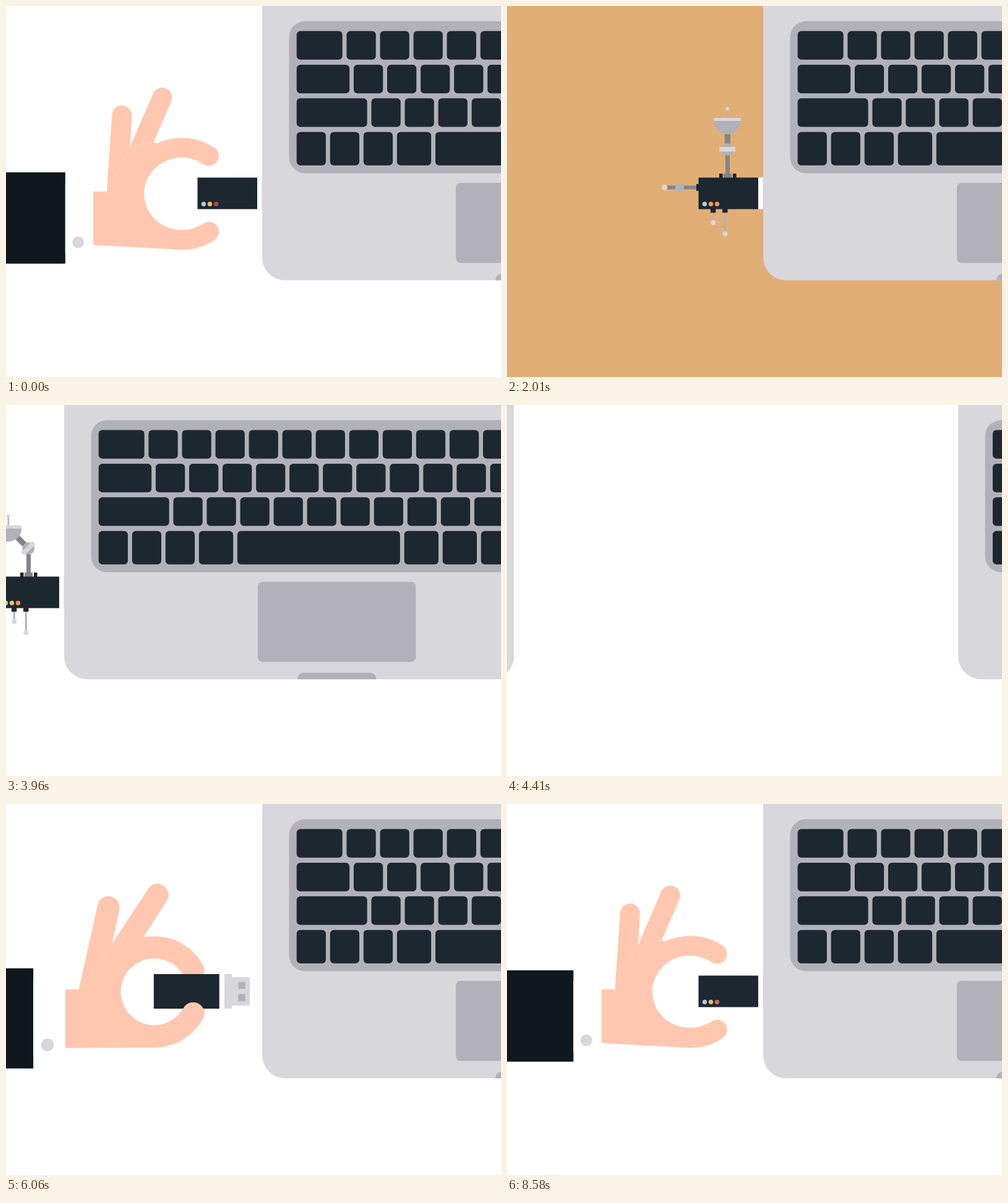
Write an HTML page with a canvas that moves like this. It is 800x600 px and loops after 8.61 s.

```html
<!DOCTYPE html>
<html lang="en">
<head>
<meta charset="utf-8">
<title>Plug in</title>
<style>
html, body { margin: 0; width: 100%; height: 100%; overflow: hidden; background: #fff; }
canvas { display: block; width: 800px; height: 600px; }
</style>
</head>
<body>
<canvas id="stage" width="800" height="600"></canvas>
<script>
const ctx = document.getElementById('stage').getContext('2d');
const LOOP = 8610, STEP = 30;
const C = {
  sand: '#e1af76', skin: '#ffc7af', sleeve: '#10181e', dark: '#1d2730',
  light: '#d8d7dc', mid: '#b2b1b9', steel: '#84848a', white: '#fff'
};

// ---- helpers ----
const lerp = (a, b, k) => a + (b - a) * k;
const part = (t, a, b) => Math.min(1, Math.max(0, (t - a) / (b - a)));
const easeOut = k => 1 - (1 - k) ** 3;
const easeIO = k => k < .5 ? 4 * k ** 3 : 1 - (2 - 2 * k) ** 3 / 2;
const move = (t, a, b, from, to, ease = easeIO) => lerp(from, to, ease(part(t, a, b)));

// cubic-bezier(.3625, 0, .1, 1), solved by bisection
function panEase(x) {
  let lo = 0, hi = 1, s = .5;
  for (let i = 0; i < 30; i++) {
    s = (lo + hi) / 2;
    const q = 1 - s;
    if (3 * q * q * s * .3625 + 3 * q * s * s * .1 + s ** 3 < x) lo = s; else hi = s;
  }
  return s * s * (3 - 2 * s);
}

function box(x1, y1, x2, y2, color) {
  ctx.fillStyle = color;
  ctx.fillRect(x1, y1, x2 - x1, y2 - y1);
}
function round(x1, y1, x2, y2, r, color) {
  ctx.fillStyle = color;
  ctx.beginPath();
  ctx.roundRect(x1, y1, x2 - x1, y2 - y1, r);
  ctx.fill();
}
function dot(x, y, r, color) {
  ctx.fillStyle = color;
  ctx.beginPath();
  ctx.arc(x, y, r, 0, Math.PI * 2);
  ctx.fill();
}
function shifted(x, y, draw, scale = 1, angle = 0) {
  ctx.save();
  ctx.translate(x, y);
  ctx.rotate(angle);
  ctx.scale(scale, scale);
  draw();
  ctx.restore();
}

// ---- laptop ----
const KEYS_LEFT = 469.7, KEYS_RIGHT = 1240, KEY = 47.3, GAP = 6.75;

function laptop() {
  round(414, -60, 1296, 443.5, 37, C.light);
  round(457.5, 24.5, 1252, 270.5, 26, C.mid);
  // the first key of a row sets its stagger, the last one fills the rest
  [74, 85.5, 114].forEach((first, row) => {
    const y = 40.5 + 54.4 * row;
    for (let x = KEYS_LEFT, w = first; x < KEYS_RIGHT; x += w + GAP, w = KEY) {
      if (x + w + GAP + KEY > KEYS_RIGHT) w = KEYS_RIGHT - x;
      round(x, y, x + w, y + 46.3, 6, C.dark);
    }
  });
  for (let i = 0, x = KEYS_LEFT; i < 10; i++) {
    const w = i === 4 ? 263 : i > 2 && i < 7 ? 55.3 : KEY;
    round(x, 203.7, Math.min(x + w, KEYS_RIGHT), 257.7, 6, C.dark);
    x += w + GAP;
  }
  round(727, 286, 982.5, 415.5, 8, C.mid);
  round(791, 433, 918.5, 443.5, [10, 10, 0, 0], C.mid);
}

// ---- hand: local space starts at the sleeve edge ----
// Thumb and forefinger form one elliptic ring, open by `gap` on each side.
const GRIP = {
  cx: 178.2, rx: 65.6, ry: 65.6, width: 32.8, gap: .506,
  littleX: 110.8, littleY: -124, longX: 182.8, longY: -142.2,
  forkX: 116.2, forkY: -70.2, webX: 161.8, webY: -79.3
};
const OPEN = {
  cx: 188.5, rx: 77, ry: 74.5, width: 32, gap: .968,
  littleX: 91.5, littleY: -126, longX: 156.5, longY: -155,
  forkX: 104.5, forkY: -75, webX: 142.5, webY: -82
};
const BASE_X = 67, BASE_Y = -3, RING_Y = .7;

function finger(x, y, r, x1, y1, x2, y2) {
  const a = Math.atan2(y - (y1 + y2) / 2, x - (x1 + x2) / 2) - Math.PI / 2;
  ctx.fillStyle = C.skin;
  ctx.beginPath();
  ctx.moveTo(x1, y1);
  ctx.arc(x, y, r, a, a + Math.PI);
  ctx.lineTo(x2, y2);
  ctx.fill();
}

function hand(open) {
  const p = {};
  for (const k in GRIP) p[k] = lerp(GRIP[k], OPEN[k], open);
  const r = p.width / 2;
  finger(p.littleX, p.littleY, r, BASE_X, BASE_Y, p.forkX, p.forkY);
  finger(p.longX, p.longY, r, p.forkX, p.forkY, p.webX, p.webY);

  ctx.beginPath();
  ctx.moveTo(45, BASE_Y);
  ctx.lineTo(BASE_X, BASE_Y);
  ctx.lineTo(p.forkX, p.forkY);
  ctx.lineTo(p.webX, p.webY);
  ctx.ellipse(p.cx, RING_Y, p.rx, p.ry, 0, -Math.PI / 2, Math.PI / 2, true);
  ctx.lineTo(p.cx, RING_Y + p.ry + r);
  ctx.lineTo(45, 83.5);
  ctx.fill();

  ctx.strokeStyle = C.skin;
  ctx.lineWidth = p.width;
  ctx.lineCap = 'round';
  ctx.beginPath();
  ctx.ellipse(p.cx, RING_Y, p.rx, p.ry, 0, -p.gap, p.gap, true);
  ctx.stroke();
}

function arm(open) {
  hand(open);
  box(-600, -34, 0, 113.7, C.sleeve);
  box(0, -17, lerp(47, 45, open), 97.2, C.white);
  dot(20.8, 79, 9.4, C.light);
}

// ---- stick ----
const STICK_X = 132, MID_Y = 303;

function stick() {
  box(281, -25.5, 292.5, 25.5, C.light);
  box(292, -21, 319, 21, C.light);
  box(302, -13.7, 312.3, -3.7, C.mid);
  box(302, 4, 312.3, 14.5, C.mid);
  box(273.5, -25.5, 281.5, 25.5, C.white);
  box(177.5, -25.5, 274, 25.5, C.dark);
}

function leds(t) {
  const blink = t > 7000 || t < 780;
  const glow = blink ? .5 + .5 * Math.cos((t + LOOP - 8520) % LOOP / 300 * Math.PI * 2) : 1;
  const third = [lerp(122, 239, glow), lerp(46, 146, glow), lerp(52, 84, glow)].map(Math.round);
  const second = t > 700 && t < 3300 ? '#ef9f5a' : '#f4b862';
  ctx.globalAlpha = t > 5300 ? part(t, 7440, 7620) : 1;
  ['#a7cfe0', second, `rgb(${third})`].forEach((c, i) => dot(319.5 + 10 * i, 320.2, 3.7, c));
  ctx.globalAlpha = 1;
}

// ---- gadgets folding out of the stick ----
function dish(t) {
  const rise = move(t, 450, 930, 76, 0, easeOut);
  const grow = easeIO(part(t, 1050, 1950));
  const tilt = move(t, 2130, 2760, 0, -Math.PI / 4);
  const len = lerp(24, 46, grow), r = lerp(9.5, 21.5, grow);
  box(353, 240 + rise, 360, 320, C.steel);
  box(350, 271 + Math.min(rise, 8), 363, 290, C.steel);
  shifted(356.3, 232 + rise, () => {
    box(-4.5, -len, 4.5, 0, C.steel);
    shifted(0, -len, () => {
      const feed = 20 * part(grow, .45, 1);
      if (feed > 3) {
        box(-1.3, -feed, 1.3, 0, C.mid);
        dot(0, -feed, 3, C.light);
      }
      ctx.fillStyle = C.mid;
      ctx.beginPath();
      ctx.arc(0, 0, r, 0, Math.PI);
      ctx.fill();
      box(-r, -lerp(2.5, 5, grow), r, 0, C.light);
    }, 1, -tilt);
    dot(0, 0, 10, C.mid);
    box(-12.8, -4, 12.8, 3.3, C.light);
  }, 1, tilt);
  const clip = (x, a) => box(x, move(t, a, a + 210, 278, 271, easeOut), x + 5.6, 278, C.dark);
  clip(343, 720);
  clip(365, 930);
}

function feeler(t) {
  const out = easeOut(part(t, 540, 900));
  const on = easeIO(part(t, 1020, 1620));
  const jx = lerp(lerp(318, 292, out), 279, on);
  const len = move(t, 1650, 2130, 0, 26) + move(t, 2580, 3060, 0, 80);
  const turn = move(t, 2130, 2580, 0, Math.PI / 4);
  const y = 293.5;
  shifted(jx, y, () => {
    if (len < 1) return;
    box(-Math.min(len, 42), -3, 0, 3, C.steel);
    box(-Math.min(len, 81), -2, 0, 2, C.steel);
    box(-len, -1.2, 0, 1.2, C.steel);
    dot(-len, 0, 4.7, C.light);
  }, 1, turn);
  box(jx, y - 3, 318, y + 3, C.steel);
  dot(jx, y, 7, C.mid);
  box(lerp(lerp(324, 298, out), 306, on), 288, 326, 299, C.dark);
}

function pin(t, x, start, tipA, tipB, endA, endB) {
  const out = easeOut(part(t, start, start + 330));
  const on = easeIO(part(t, 1050, 1800));
  const tip = lerp(lerp(322, tipA, out), tipB, on);
  const end = lerp(lerp(320, endA, out), endB, on);
  box(x - 1.5, 318, x + 1.5, tip, C.mid);
  dot(x, tip, 4, C.light);
  box(x - 4.2, 318, x + 4.2, end, C.dark);
}

function gadgets(t) {
  dish(t);
  feeler(t);
  pin(t, 333.2, 570, 342, 350.3, 340, 334.3);
  pin(t, 352.3, 660, 337, 368.3, 334.8, 334.3);
}

// ---- scenes ----
function device(t) {
  gadgets(t);
  shifted(STICK_X, MID_Y, stick);
  leds(t);
}

function leaving(t) {
  const since = (t > 7000 ? t : t + LOOP) - 8361;
  return STICK_X - 36.2 * Math.max(0, since / 249) ** 3;
}

function plugging(t) {
  const enter = 1 - (1 - part(t, 5640, 6480)) ** 5;
  const push = easeIO(part(t, 6480, 7320));
  const x = lerp(lerp(-355, 57, enter), STICK_X, push);
  const scale = lerp(1.097, 1, push);
  const open = easeIO(part(t, 7440, 8280));
  const handX = t > 8361 ? leaving(t) : x;
  shifted(handX, MID_Y, () => arm(open), scale);
  shifted(x, MID_Y, stick, scale);
  leds(t);
  // the thumb lies over the stick
  shifted(handX, MID_Y, () => {
    ctx.beginPath();
    ctx.rect(60, 4, 300, 120);
    ctx.clip();
    hand(open);
  }, scale);
}

function draw(t) {
  box(0, 0, 800, 600, t >= 420 && t < 3630 ? C.sand : C.white);
  if (t < 3630) {
    const x = leaving(t);
    if (t < 600 && x > -270) shifted(x, MID_Y, () => arm(1));
    device(t);
    laptop();
  } else if (t < 5280) {
    const pan = 1600 * panEase((t - 3630) / 1650);
    shifted(-pan, 0, () => { device(t); laptop(); });
    shifted(1600 - pan, 0, laptop);
  } else {
    if (t >= 5640) plugging(t);
    laptop();
  }
}

const start = performance.now();
function tick() {
  const t = (performance.now() - start) % LOOP;
  draw(Math.floor(t / STEP) * STEP);
  requestAnimationFrame(tick);
}
tick();
</script>
</body>
</html>
```
